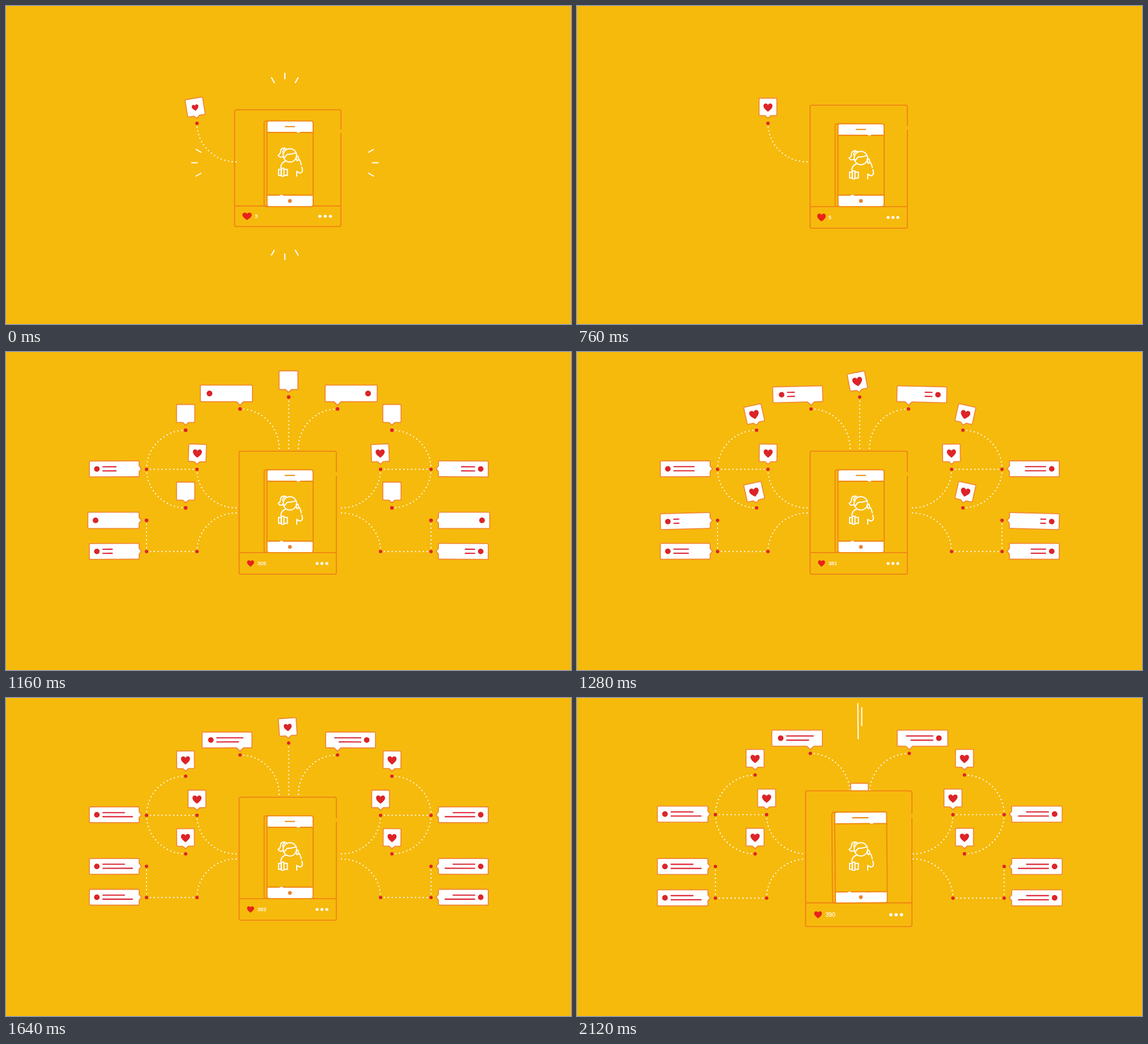
Animation of 997 by 561 pixels, one loop 2160 ms. Source, as an HTML page:

```html
<!DOCTYPE html>
<html lang="en">
<head>
<meta charset="utf-8">
<title>Sharing a post</title>
<style>
  html, body { margin: 0; width: 100%; height: 100%; overflow: hidden; background: #f6ba0d; }
  svg { display: block; width: 100vw; height: 100vh; }
  text { font: 9.2px "Liberation Sans", Arial, sans-serif; fill: #fff; stroke: #fff; stroke-width: .2; }
  .edge { fill: none; stroke: #f08a12; stroke-width: 2.1; stroke-linejoin: round; vector-effect: non-scaling-stroke; }
  .bubble { fill: #fff; stroke: #f08a34; stroke-width: 1.8; stroke-linejoin: round; }
  .red { fill: #dc2428; }
  .line { fill: none; stroke: #dc2432; stroke-width: 2.1; stroke-linecap: round; }
  .white { fill: none; stroke: #fff; stroke-width: 2; stroke-linecap: round; stroke-linejoin: round; }
  .dots { fill: none; stroke: #fff; stroke-width: 2.3; stroke-linecap: round; }
</style>
</head>
<body>
<svg id="stage" viewBox="0 0 997 561"></svg>
<script>
const LOOP = 2160, STEP = 40, BG = '#f6ba0d';
const HEART = 'M0 7.5C-3 5-8 1.5-8-2.8C-8-7.7-2-8.6 0-4.6C2-8.6 8-7.7 8-2.8C8 1.5 3 5 0 7.5Z';
const stage = document.getElementById('stage');
const updates = [];

function el(tag, attrs, parent) {
  const node = document.createElementNS('http://www.w3.org/2000/svg', tag);
  set(node, attrs);
  return parent.appendChild(node);
}
function set(node, attrs) {
  for (const name in attrs) node.setAttribute(name, attrs[name]);
}
const group = (parent, attrs = {}) => el('g', attrs, parent);

// Motion rules
const ramp = (t, a, b) => Math.min(1, Math.max(0, (t - a) / (b - a)));
const bump = (t, mid, width) => Math.exp(-(((t - mid) / width) ** 2));
const ring = age => Math.exp(-age / 90) * Math.cos(age * Math.PI / 150);
const swing = age => age < 0 ? 0 : -24 * Math.sin(age * Math.PI / 180) * Math.exp(-age / 120);
const expand = t => ramp(t, 1960, 2120) ** 2;
function pop(t, start, duration = 100) {
  const q = ramp(t, start, start + duration) - 1;
  return Math.max(0, 1 + 2.7 * q ** 3 + 1.7 * q ** 2);
}

function dots(parent, d, progress) {
  const path = el('path', { d, class: 'dots' }, parent);
  const length = path.getTotalLength(), count = Math.round(length / 6.75), points = [];
  for (let i = 0; i <= count; i++) {
    const p = path.getPointAtLength(length * i / count);
    points.push(`M${p.x.toFixed(2)} ${p.y.toFixed(2)}h.01`);
  }
  updates.push(t => {
    const p = progress(t);
    path.setAttribute('d', p > 0 ? points.slice(0, Math.floor(p * count + .001) + 1).join('') : 'M0 0');
  });
}

function node(parent, x, y, size) {
  const c = el('circle', { cx: x, cy: y, class: 'red' }, parent);
  updates.push(t => c.setAttribute('r', 3 * size(t)));
}

// Pops up at "born", then swings while its heart grows; "extra" adjusts the pose
function heartBox(parent, x, y, born, extra = () => ({})) {
  const g = group(parent);
  el('path', { class: 'bubble', d: 'M-14-35.5H14q1.7 0 1.7 1.7V-6.2q0 1.7-1.7 1.7H5L0 0L-5-4.5H-14q-1.7 0-1.7-1.7V-33.8q0-1.7 1.7-1.7Z' }, g);
  const heart = el('path', { d: HEART, class: 'red' }, g);
  updates.push(t => {
    const { dy = 0, turn = 0, size = 1 } = extra(t);
    set(g, { transform: `translate(${x} ${y + dy}) rotate(${swing(t - born - 100) + turn}) scale(${pop(t, born)})` });
    set(heart, { transform: `translate(0 -19) scale(${size * pop(t, born + 100, 140)})` });
  });
}

const SIDE = {
  x: -48, y: 0, dot: -30.7, text: -20, lines: [38, 52],
  outline: 'M-42.3-14H42.3q1.7 0 1.7 1.7V-5L48 0L44 5V12.3q0 1.7-1.7 1.7H-42.3q-1.7 0-1.7-1.7V-12.3q0-1.7 1.7-1.7Z'
};
const BELOW = {
  x: -23, y: -20, dot: -28.5, text: -18, lines: [46, 38],
  outline: 'M-42.3-14H42.3q1.7 0 1.7 1.7V12.3q0 1.7-1.7 1.7H29L23 20L17 14H-42.3q-1.7 0-1.7-1.7V-12.3q0-1.7 1.7-1.7Z'
};

// x, y is the tip of the tail; pace is the writing speed in px per ms
function comment(parent, x, y, shape, born, lean, pace) {
  const g = group(parent);
  const panel = group(g, { transform: `translate(${shape.x} ${shape.y})` });
  el('path', { class: 'bubble', d: shape.outline }, panel);
  el('circle', { cx: shape.dot, cy: 0, r: 4.9, class: 'red' }, panel);
  const text = el('path', { class: 'line' }, panel);
  updates.push(t => {
    const written = Math.max(0, pace * (t - born - 90));
    const [a, b] = shape.lines.map(length => Math.min(length, written));
    set(g, { transform: `translate(${x} ${y}) rotate(${lean * swing(t - born - 100)}) scale(${pop(t, born)})` });
    set(text, { d: written ? `M${shape.text}-3.8h${a}M${shape.text} 3.4h${b}` : 'M0 0' });
  });
}

function branch(parent, first) {
  const during = (a, b) => t => ramp(t, a, b);
  const born = first ? -130 : 850;
  dots(parent, 'M406 275A69 68 0 0 1 337 207', first ? () => 1 : during(760, 880));
  dots(parent, 'M406 284A69 68 0 0 0 337 352', during(760, 880));
  for (const y of [207, 352]) dots(parent, `M337 ${y}H248`, during(840, 940));
  dots(parent, 'M248 207A69 69 0 0 1 317 138', during(960, 1120));
  dots(parent, 'M248 207A69 69 0 0 0 317 275', during(960, 1120));
  dots(parent, 'M248 352V297', during(970, 1150));
  dots(parent, 'M482 170A69 69.5 0 0 0 413 100.5', during(960, 1120));

  node(parent, 337, 207, t => pop(t, born));
  node(parent, 337, 352, t => pop(t, 850));
  for (const y of [207, 352]) node(parent, 248, y, t => pop(t, 890));
  for (const [x, y] of [[317, 138], [317, 275], [248, 297], [413, 100.5]]) node(parent, x, y, t => pop(t, 1090));

  heartBox(parent, 337, 198, born, t => ({ turn: first ? swing(t - 950) : 0 }));
  for (const y of [129, 266]) heartBox(parent, 317, y, 1120);

  comment(parent, 239, 206, SIDE, 850, -.12, .105);
  comment(parent, 239, 351.5, SIDE, 850, -.12, .075);
  comment(parent, 239, 297, SIDE, 1120, .12, .125);
  comment(parent, 413, 94, BELOW, 1080, .14, .11);
}

function rays() {
  const g = group(stage);
  const paths = [0, 1, 2, 3].map(i => el('path', {
    class: 'white', 'stroke-width': 2.4,
    transform: `translate(492 ${i % 2 ? 276.5 : 283}) rotate(${i * 90})`
  }, g));
  updates.push(t => {
    const p = ramp(t, 0, 360), out = 4.5 * p * (2 - p), inner = -10 + 14 * p;
    const ray = (x, y, dx, dy) => `M${x + dx * out} ${y + dy * out}L${x + dx * inner} ${y + dy * inner}`;
    const d = ray(0, -164.5, 0, -1) + ray(-23.5, -156.5, -.5, -.866) + ray(23.5, -156.5, .5, -.866);
    paths.forEach(path => set(path, { d }));
    set(g, { visibility: t < 400 ? 'visible' : 'hidden' });
  });
}

function topHeart() {
  dots(stage, 'M498.8 170V80', t => ramp(t, 970, 1150) - ramp(t, 1780, 1920));
  node(stage, 498.8, 79.5, t => pop(t, 1090) * (1 - ramp(t, 1740, 1820)));
  const streaks = el('path', { class: 'white', 'stroke-width': 2.4, d: 'M495.5 10L496.2 72M502.5 17V48.5' }, stage);
  heartBox(stage, 498.5, 71, 1085, t => ({
    dy: 115 * ramp(t, 2000, 2120) ** 2 - 14 * Math.sin(Math.PI * ramp(t, 1840, 2040)),
    turn: .3 * swing(t - 1600),
    size: 1 - ramp(t, 1600, 1920)
  }));
  updates.push(t => set(streaks, {
    visibility: t >= 2080 ? 'visible' : 'hidden',
    transform: `translate(0 ${.7 * (t - 2120)})`
  }));
}

function likes(t) {
  if (t < 1000) return Math.min(5, 3 + Math.floor(t / 120));
  return Math.floor(5 + 376 * ramp(t, 1000, 1200) + 9 * ramp(t, 1200, 2120) ** 2);
}

function post() {
  const g = group(stage);
  const fill = el('rect', { x: 411.3, y: 175, width: 171.7, height: 217, rx: 3, fill: BG }, g);
  el('path', { class: 'edge', d: 'M583 212V178q0-3-3-3H414.3q-3 0-3 3V389q0 3 3 3H580q3 0 3-3V218M411.3 354H583' }, g);
  const heart = el('path', { d: HEART, fill: '#e8221a' }, g);
  const label = el('text', { x: 443.7, y: 376.4 }, g);
  const menu = [0, 1, 2].map(i => el('circle', { cx: 549 + 8.55 * i, cy: 373, fill: '#fff' }, g));
  updates.push(t => {
    const squash = ring(t), pulse = bump(t, 950, 56) + expand(t), beat = bump(t, 1000, 50);
    const sx = 1 + .093 * (squash + pulse), sy = 1 - .051 * squash + .104 * pulse;
    const size = 15 + 4.5 * beat - 2.6 * ramp(t, 1000, 1160);
    set(g, { transform: `translate(497 ${283.5 + 2.5 * squash}) scale(${sx} ${sy}) translate(-497 -283.5)` });
    set(fill, { visibility: t >= 640 ? 'visible' : 'hidden' });
    set(heart, { transform: `translate(431.5 373) scale(${size / 16})` });
    menu.forEach(c => set(c, { r: 2.6 * (1 - beat) }));
    label.textContent = likes(t);
  });
}

function phone() {
  const g = group(stage);
  const back = el('rect', { class: 'edge', rx: 3.5 }, g);
  const body = el('rect', { rx: 3.5, fill: BG }, g);
  const bars = el('path', { fill: '#fff' }, g);
  const edge = el('path', { class: 'edge' }, g);
  const glints = el('path', { class: 'white', 'stroke-width': 2.6 }, g);
  const button = el('circle', { cx: 501, r: 3.4, fill: '#ea8434' }, g);
  updates.push(t => {
    const grow = expand(t);
    const top = 207.7 - 5 * ring(t) - 6.5 * grow, bottom = 354 + 7.5 * grow;
    const left = 460.5 - 4.5 * grow, right = 542 + 5.7 * grow;
    const a = top + 20.4, b = bottom - 20.4 + .8 * grow, half = 9 + 5.5 * grow;
    const box = { y: top, height: bottom - top };
    set(back, { ...box, x: left - 5, width: 30 });
    set(body, { ...box, x: left, width: right - left });
    const bar = (inner, outer, r) =>
      `M${left} ${inner}V${outer - r}q0 ${r} 3.5 ${r}H${right - 3.5}q3.5 0 3.5 ${-r}V${inner}Z`;
    const d = bar(a, top, -3.5) + bar(b, bottom, 3.5);
    set(bars, { d });
    set(edge, { d: `${d}M${left} ${a}V${b}M${right} ${a}V${b}M${501 - half} ${top + 10}H${501 + half}` });
    set(glints, { d: `M${514 + 5 * grow} ${a - .6}h4M${484 - 5 * grow} ${b + .6}h4` });
    set(button, { cy: bottom - 10.2 });
    set(g, { transform: `rotate(${-.5 * grow} 501 ${bottom})` });
  });
}

function caller() {
  const g = group(stage, { class: 'white' });
  el('circle', { cx: 501, cy: 268.2, r: 11.8 }, g);
  el('path', { d: [
    'M491 272.5L496 266.5C502 266.5 507 265.5 511.8 263.5',
    'M495.5 257.5C491 253 484.5 256 484.5 261C484.5 265 482.5 267 480.3 268C482 272 486 272.5 489.3 270',
    'M489.5 265C487.5 261.5 488.5 258.5 491.5 257',
    'M493 278.5C487.5 280.5 485 285 485 290',
    'M511.8 271L515 269.5L517.2 276L513.5 277.5Z',
    'M517.5 276C519.5 277.5 520 281 521 285',
    'M522 289C524.5 296 522.5 299 518.5 299.5L513 296.5V305',
    'M481 293H485.5V303.5H481ZM486 291H490.5V304.5Q488.3 306 486 304.5ZM491 293H496.5V303.5H491'
  ].join('') }, g);
  updates.push(t => set(g, { transform: `translate(0 ${-4.7 * ring(t) - 1.2 * ramp(t, 840, 960)})` }));
}

rays();
const network = group(stage);
branch(group(network), true);
branch(group(network, { transform: 'translate(998 0) scale(-1 1)' }), false);
updates.push(t => set(network, {
  transform: `translate(499 283) scale(${1 + .015 * expand(t)}) translate(-499 -283)`
}));
topHeart();
post();
phone();
caller();

const begin = performance.now();
function draw() {
  const t = Math.floor((performance.now() - begin) % LOOP / STEP) * STEP;
  updates.forEach(update => update(t));
  requestAnimationFrame(draw);
}
draw();
</script>
</body>
</html>
```
